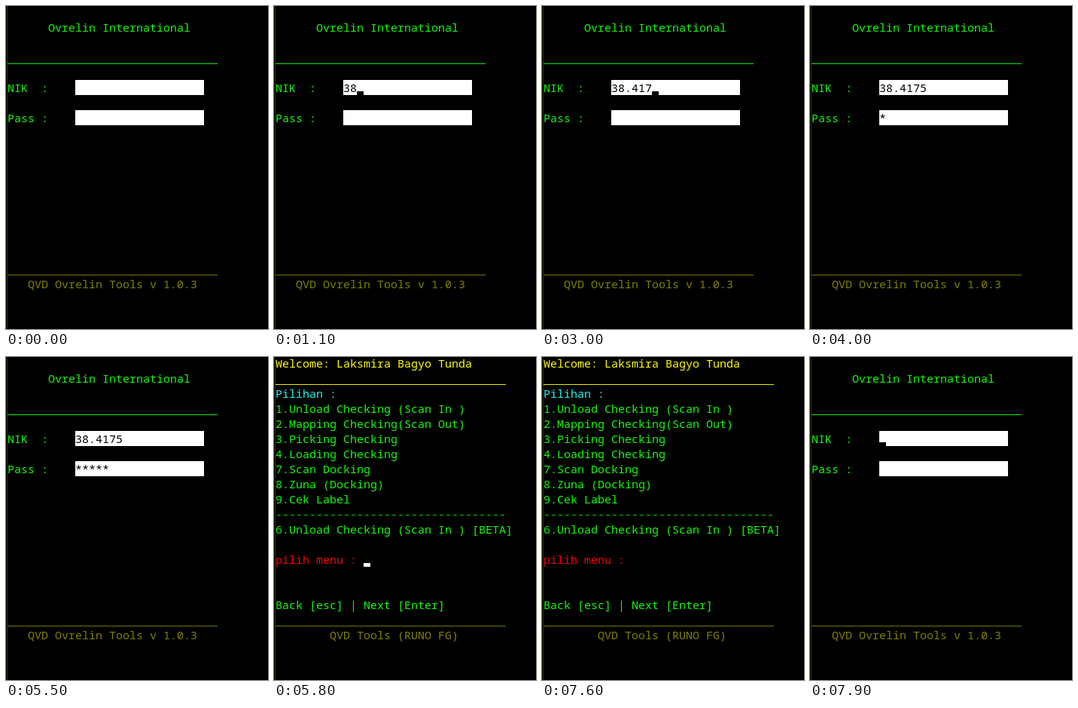
Recreate the animation shown at these times as an HTML page. Size 348 by 428 pixels, loop 8000 ms.

```html
<!DOCTYPE html>
<html lang="id">
<head>
<meta charset="utf-8">
<title>Terminal login</title>
<style>
  html, body { margin: 0; width: 100%; height: 100%; overflow: hidden; background: #000; }

  /* Character grid: cells of 9 x 20 px, first cell at (2, -2) */
  #term {
    position: absolute; left: 0; top: 0; width: 348px; height: 428px;
    overflow: hidden; background: #000; color: #14fa0c;
    font: 15px/20px "Noto Sans Mono", "DejaVu Sans Mono", monospace;
    font-variant-ligatures: none;
  }
  #term::before {
    content: ""; position: absolute; left: 1px; top: 0;
    width: 1px; height: 100%; background: #330;
  }
  pre, .field, .typed, .rule, #cursor { position: absolute; margin: 0; }
  pre { left: 2px; top: -2px; font: inherit; }
  .screen { position: absolute; inset: 0; }

  .olive { color: #808000; }
  .yellow { color: #ff0; }
  .aqua { color: #1ef5f0; }
  .red { color: #f00; }
  .dim { color: #00c800; }

  .rule { left: 2px; height: 1px; background: currentColor; opacity: .92; }
  .login .rule { width: 279px; }
  .menu .rule { width: 306px; }

  .field { left: 92px; width: 171px; height: 20px; background: #fff; color: #000; }
  .typed { left: 0; top: 0; height: 20px; overflow: hidden; white-space: pre; }
  #cursor { left: 2px; top: 13px; width: 9px; height: 5px; }

  .login, .menu, .typed, #cursor { animation: 8s step-end infinite; }
  .login { animation-name: login; }
  .menu { animation-name: menu; }
  .nik { animation-name: nik; }
  .pass { animation-name: pass; }
  #cursor { animation-name: move, blink; }

  @keyframes login {
    0%, 97.5% { visibility: visible; }
    72.5% { visibility: hidden; }
  }
  @keyframes menu {
    0%, 97.5% { visibility: hidden; }
    72.5% { visibility: visible; }
  }
  @keyframes nik {
    0%, 97.5%, 100% { width: 0; }
    11.25% { width: 9px; }
    13.75% { width: 18px; }
    25% { width: 27px; }
    30% { width: 36px; }
    32.5% { width: 45px; }
    36.25% { width: 54px; }
    38.75% { width: 63px; }
  }
  @keyframes pass {
    0%, 97.5%, 100% { width: 0; }
    50% { width: 9px; }
    57.5% { width: 18px; }
    61.25% { width: 27px; }
    62.5% { width: 36px; }
    65% { width: 45px; }
  }
  @keyframes move {
    0%, 97.5%, 100% { transform: translate(90px, 100px); background: #000; }
    11.25% { transform: translate(99px, 100px); }
    13.75% { transform: translate(108px, 100px); }
    25% { transform: translate(117px, 100px); }
    30% { transform: translate(126px, 100px); }
    32.5% { transform: translate(135px, 100px); }
    36.25% { transform: translate(144px, 100px); }
    38.75% { transform: translate(153px, 100px); }
    43.75% { transform: translate(90px, 140px); }
    50% { transform: translate(99px, 140px); }
    57.5% { transform: translate(108px, 140px); }
    61.25% { transform: translate(117px, 140px); }
    62.5% { transform: translate(126px, 140px); }
    65% { transform: translate(0, 160px); background: #fff; }
    72.5% { transform: translate(117px, 260px); background: #fff; }
  }
  @keyframes blink {
    0%, 10%, 16.25%, 28.75%, 35%, 42.5%, 48.75%, 62.5%, 68.75%, 82.5%, 95% { opacity: 0; }
    2.5%, 11.25%, 22.5%, 30%, 36.25%, 43.75%, 56.25%, 65%, 72.5%, 88.75%, 97.5% { opacity: 1; }
  }
</style>
</head>
<body>
<div id="term">
  <div class="screen login">
<pre>
&#8203;
      Ovrelin International



NIK  :

Pass :










<span class="olive">   QVD Ovrelin Tools v 1.0.3</span></pre>
    <div class="rule" style="top:76px"></div>
    <div class="rule olive" style="top:356px"></div>
    <div class="field" style="top:98px"><div class="typed nik">38.4175</div></div>
    <div class="field" style="top:138px"><div class="typed pass">*****</div></div>
  </div>

  <div class="screen menu">
<pre>
<span class="yellow">Welcome: Laksmira Bagyo Tunda</span>

<span class="aqua">Pilihan :</span>
1.Unload Checking (Scan In )
2.Mapping Checking(Scan Out)
3.Picking Checking
4.Loading Checking
7.Scan Docking
8.Zuna (Docking)
9.Cek Label
<span class="dim">----------------------------------</span>
6.Unload Checking (Scan In ) [BETA]

<span class="red">pilih menu :</span>


Back [esc] | Next [Enter]

<span class="olive">        QVD Tools (RUNO FG)</span></pre>
    <div class="rule yellow" style="top:36px"></div>
    <div class="rule olive" style="top:356px"></div>
  </div>

  <div id="cursor"></div>
</div>
</body>
</html>
```
